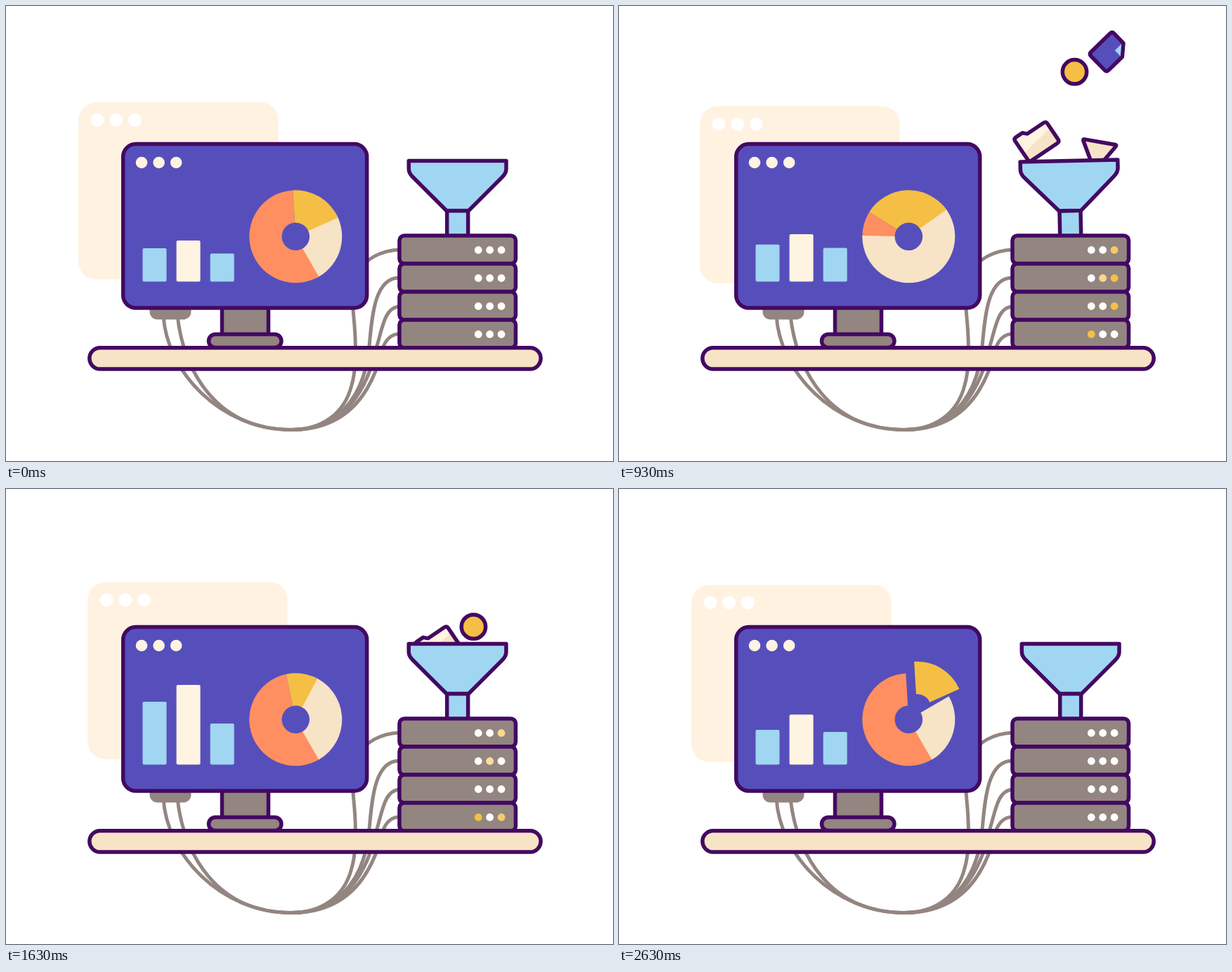
Recreate the animation shown at these times as an HTML page. Size 864 by 648 pixels, loop 2660 ms.

```html
<!DOCTYPE html>
<html lang="en">
<head>
<meta charset="utf-8">
<title>Data pipeline</title>
<style>
  html, body { margin: 0; width: 100%; height: 100%; overflow: hidden; background: #fff; }
  svg { display: block; width: 100%; height: 100%; }
  .ink { stroke: #430962; stroke-width: 5.5; stroke-linejoin: round; }
  .gray { fill: #938580; }
  .blue { fill: #a0d6f1; }
  .cream { fill: #f7e3c5; }
  .pale { fill: #fff3e2; }
  .yellow { fill: #f4bf44; }
  .orange { fill: #ff8f61; }
  .purple { fill: #564fbb; }
  .cable { fill: none; stroke: #938580; stroke-width: 5; }
</style>
</head>
<body>
<svg viewBox="0 0 864 648">
  <defs>
    <clipPath id="aboveRim"><rect width="864" height="221"/></clipPath>
    <g id="paper">
      <path class="ink purple" d="M-18 -19Q-18 -23 -14 -23H5L18 -8V19Q18 23 14 23H-14Q-18 23 -18 19Z"/>
      <path class="blue" d="M4 -20V-7H15.5Z"/>
    </g>
    <g id="folder">
      <path class="ink cream" d="M-26 -17Q-26 -21 -22 -21H-11L-6 -16H22Q26 -16 26 -12V15Q26 19 22 19H-22Q-26 19 -26 15Z"/>
      <path class="pale" d="M-23 -18H-12L-7 -13H23V-4L-23 4Z"/>
    </g>
    <path id="triangle" class="ink cream" d="M-22 -14H22Q25 -14 23 -11L2 25Q0 28 -2 25L-23 -11Q-25 -14 -22 -14Z"/>
    <circle id="ball" class="ink yellow" r="17.2"/>
  </defs>

  <g id="card">
    <rect width="284.5" height="252" rx="25" fill="#fff2e1"/>
    <g fill="#fff">
      <circle cx="27" cy="25.3" r="9.5"/>
      <circle cx="53.6" cy="25.3" r="9.5"/>
      <circle cx="80.3" cy="25.3" r="9.5"/>
    </g>
  </g>

  <g class="cable">
    <path d="M224 440C228 520 305 603.500 406 603.500"/>
    <path d="M244 440C252 520 300 603.500 406 603.500"/>
    <path d="M560 347C530 349 515 361 505 372C488 392 494 430 496 455C499 495 498 520 492 540C482 580 450 603.500 406 603.500"/>
    <path d="M560 387C525 387 521 440 517 485C512 540 485 603.500 406 603.500"/>
    <path d="M560 428C539 429 536 458 528 484C518 530 492 603.500 406 603.500"/>
    <path d="M560 467C548 467 540 476 536 488C526 530 500 603.500 406 603.500"/>
  </g>

  <rect class="gray" x="204.5" y="415" width="59" height="31.5" rx="11"/>
  <rect class="ink gray" x="307.5" y="425" width="66" height="43"/>
  <rect class="ink gray" x="288.5" y="467.5" width="103.5" height="19" rx="9.5"/>
  <rect class="ink purple" x="166.7" y="196.6" width="347" height="233.4" rx="18"/>
  <g class="pale">
    <circle cx="193" cy="223" r="8.3"/>
    <circle cx="217.6" cy="223" r="8.3"/>
    <circle cx="242.2" cy="223" r="8.3"/>
  </g>
  <g id="bars"></g>
  <path id="orange" class="orange"/>
  <path id="cream" class="cream"/>
  <path id="yellow" class="yellow"/>

  <g id="items" clip-path="url(#aboveRim)"></g>
  <g id="funnel" class="ink blue">
    <rect x="627.7" y="291.5" width="30" height="45"/>
    <path d="M573.3 220.5H712V232Q712 238 706.5 243.5L658.5 291.5H627L579 243.5Q573.3 238 573.3 232Z"/>
  </g>
  <g id="servers"></g>
  <rect class="ink cream" x="118.8" y="486.7" width="642.4" height="30.3" rx="15.1"/>
</svg>

<script>
const LOOP = 2660;
const $ = id => document.getElementById(id);
const clamp = v => Math.min(1, Math.max(0, v));
const progress = (from, to, t) => clamp((t - from) / (to - from));
const smooth = (from, to, t) => {
  const u = progress(from, to, t);
  return u * u * (3 - 2 * u);
};

function add(parent, tag, attrs) {
  const el = document.createElementNS('http://www.w3.org/2000/svg', tag);
  for (const k in attrs) el.setAttribute(k, attrs[k]);
  return parent.appendChild(el);
}

function drawCard(t) {
  const a = t / LOOP * 2 * Math.PI;
  $('card').setAttribute('transform',
    `translate(${110.6 - 7.5 * Math.cos(a)} ${137.2 + 7 * Math.sin(a)})`);
}

// Each bar swells slightly, then jumps up and drains, a little later than its neighbour.
const BASE = 392.5;
const bars = [
  { rest: 47.5, swell: 11, jump: 42, color: 'blue' },
  { rest: 58.5, swell: 14, jump: 55, color: 'pale' },
  { rest: 40, swell: 10, jump: 18.5, color: 'blue' }
].map((bar, i) => ({
  ...bar,
  el: add($('bars'), 'rect', { class: bar.color, x: 194.5 + 48.1 * i, width: 34, rx: 2 })
}));

function drawBars(t) {
  bars.forEach(({ rest, swell, jump, el }, i) => {
    const peak = 610 + 70 * i;
    const low = 1 - smooth(0, 620, Math.abs(t - peak));
    const high = smooth(1230, 1630, t) * (1 - progress(1630, 2680 + 250 * i, t));
    const h = rest + swell * low + jump * high;
    el.setAttribute('y', BASE - h);
    el.setAttribute('height', h);
  });
}

// The slice edges make two turns, each with its own pace.
function edge(angle, start, length, p, q) {
  return t => {
    const u = clamp((t - start) / length), a = u ** p, b = (1 - u) ** q;
    return angle + 720 * a / (a + b);
  };
}
const yellowEdge = edge(-3.5, 450, 1450, 1.3, 2.8);
const creamEdge = edge(66, 0, 1900, 1.6, 1.6);
const orangeEdge = edge(150, 0, 1540, 1.65, 1.65);

function slice(from, to, shift = 0) {
  const cx = 412.3 + 0.58 * shift, cy = 328.3 - 0.815 * shift;
  const at = (deg, r) => {
    const a = deg * Math.PI / 180;
    return (cx + r * Math.sin(a)).toFixed(2) + ' ' + (cy - r * Math.cos(a)).toFixed(2);
  };
  const big = to - from > 180 ? 1 : 0;
  return `M${at(from, 66)}A66 66 0 ${big} 1 ${at(to, 66)}` +
         `L${at(to, 19.8)}A19.8 19.8 0 ${big} 0 ${at(from, 19.8)}Z`;
}

function drawPie(t) {
  const y = yellowEdge(t), c = creamEdge(t), o = orangeEdge(t);
  const pop = 36.7 * (smooth(1850, 2030, t) - smooth(2270, 3050, t));
  $('orange').setAttribute('d', slice(o - 1, y + 360));
  $('cream').setAttribute('d', slice(c - 6, o));
  $('yellow').setAttribute('d', slice(y, c, pop));
}

// Items grow, fall under gravity, land on the pile and sink within `stay` ms.
const FALL = 230, GRAVITY = 0.0035;
const items = [
  { shape: 'paper', start: 312, x: 608, drift: 0.05, rest: 190, turn: [-88, -20], stay: 210 },
  { shape: 'triangle', start: 576, x: 694.5, drift: -0.1, rest: 190, turn: [-10, 10], stay: 250 },
  { shape: 'ball', start: 780, x: 648.5, drift: 0, rest: 190, turn: [0, 0], stay: 220 },
  { shape: 'paper', start: 810, x: 698, drift: 0, rest: 190, turn: [70, 24], stay: 480 },
  { shape: 'folder', start: 700, x: 595, drift: 0.028, rest: 192, turn: [11, -34], stay: 1060 },
  { shape: 'ball', start: 1010, x: 599, drift: 0.17, rest: 173, turn: [0, 0], stay: 680 }
].map(item => ({ ...item, el: add($('items'), 'use', { href: '#' + item.shape }) }));

function drawItems(t) {
  for (const { el, start, x, drift, rest, turn, stay } of items) {
    const age = t - start, landed = Math.max(0, age - FALL);
    const y = Math.min(rest, 14 + GRAVITY * age * age) + 70 * (landed / stay) ** 2;
    const shown = age > 0 && y < 275;
    el.style.display = shown ? '' : 'none';
    if (!shown) continue;
    const angle = turn[0] + (turn[1] - turn[0]) * clamp(age / FALL);
    el.setAttribute('transform',
      `translate(${x + drift * landed} ${y}) rotate(${angle}) scale(${clamp(age / 100)})`);
  }
}

function drawFunnel(t) {
  const tilt = t > 630 && t < 2030 ? 1.2 * Math.sin((t - 630) * Math.PI / 200) : 0;
  $('funnel').setAttribute('transform', `rotate(${tilt} 643 325)`);
}

// Every light flashes at two seeded random moments.
let seed = 7;
const random = () => (seed = seed * 16807 % 2147483647) / 2147483647;
const lights = [];
for (let row = 0; row < 4; row++) {
  const y = 327 + 40 * row;
  add($('servers'), 'rect', { class: 'ink gray', x: 560, y, width: 165.5, height: 40, rx: 7 });
  for (let col = 0; col < 3; col++) {
    lights.push({
      el: add($('servers'), 'circle', { cx: 672.3 + 16.4 * col, cy: y + 20.5, r: 5.4 }),
      flashes: [350 + 900 * random(), 1250 + 900 * random()]
    });
  }
}

function drawLights(t) {
  for (const { el, flashes } of lights) {
    const gap = Math.min(...flashes.map(at => Math.abs(t - at)));
    const k = 1 - progress(60, 160, gap);
    el.setAttribute('fill', `rgb(${255 - 11 * k},${255 - 64 * k},${255 - 187 * k})`);
  }
}

const parts = [drawCard, drawBars, drawPie, drawItems, drawFunnel, drawLights];

function frame() {
  const t = performance.now() % LOOP;
  parts.forEach(draw => draw(t));
  requestAnimationFrame(frame);
}
frame();
</script>
</body>
</html>
```
